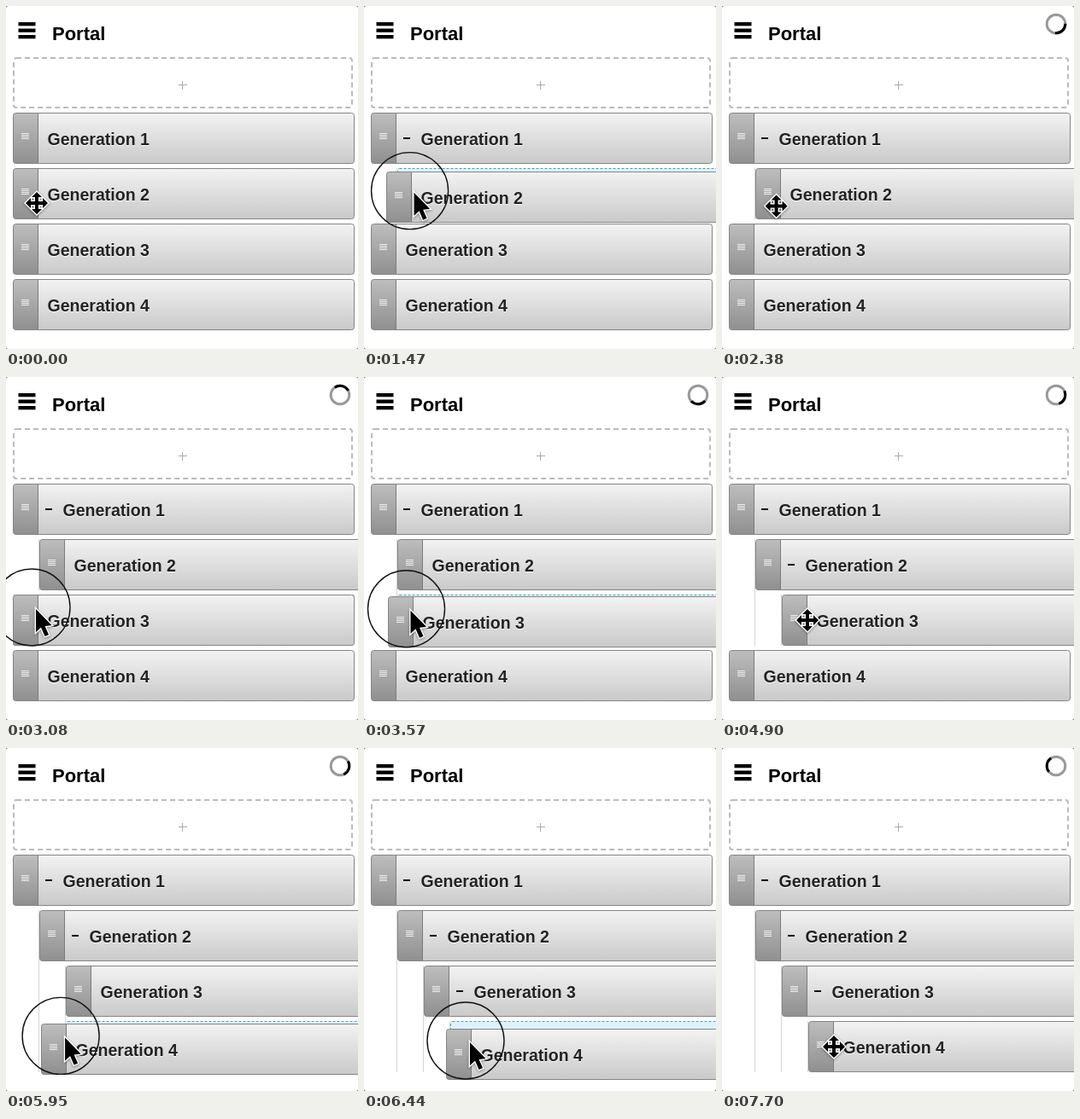
An HTML page with a canvas for the animation above (7.77 s loop, 412 by 402 pixels).

```html
<!DOCTYPE html>
<html lang="en">
<head>
<meta charset="utf-8">
<title>Nested list</title>
<style>
html, body { margin: 0; width: 100%; height: 100%; overflow: hidden; background: #fff; }
canvas { display: block; }
</style>
</head>
<body>
<canvas id="stage" width="412" height="402"></canvas>
<script>
const c = document.getElementById('stage').getContext('2d');
const LOOP = 7770, STEP = 70, SAVE_TIME = 1890;
const LEFT = 8, INDENT = 31, WIDTH = 400, HEIGHT = 60;

// The pointer travels to `grab`, presses, carries the item to `to` and drops it
const start = { x: 33, y: 222 }, rest = { x: 128, y: 341 };
const drags = [
  { item: 1, grab: { x: 36, y: 213 }, to: { x: 65, y: 219 },
    travel: 840, press: 910, carry: 1190, arrive: 1680, drop: 1960 },
  { item: 2, grab: { x: 30, y: 270 }, to: { x: 97, y: 276 },
    travel: 2240, press: 2870, carry: 3220, arrive: 4200, drop: 4550 },
  { item: 3, grab: { x: 31, y: 334 }, to: { x: 119, y: 343 },
    travel: 4900, press: 5460, carry: 5600, arrive: 6440, drop: 6860 }
];

const rowY = i => 125 + 65 * i;
const levelX = level => LEFT + INDENT * level;

function ease(t, from, to) {
  const k = Math.min(1, Math.max(0, (t - from) / (to - from)));
  return k * k * (3 - 2 * k);
}

function pointerAt(t) {
  let { x, y } = start;
  const approach = (p, from, to) => {
    const k = ease(t, from, to);
    x += (p.x - x) * k;
    y += (p.y - y) * k;
  };
  for (const d of drags) {
    approach(d.grab, d.travel, d.press);
    approach(d.to, d.carry, d.arrive);
  }
  approach(rest, drags[2].drop, LOOP - 3 * STEP);
  return { x, y };
}

function rect(x, y, w, h, color) {
  c.fillStyle = color;
  c.fillRect(x, y, w, h);
}

function text(str, x, y, size, color) {
  c.font = `bold ${size}px "Liberation Sans", Arial, sans-serif`;
  c.fillStyle = color;
  c.fillText(str, x, y);
}

function fade(top, bottom) {
  const g = c.createLinearGradient(0, 0, 0, HEIGHT);
  g.addColorStop(0, top);
  g.addColorStop(1, bottom);
  return g;
}

function roundBox(x, y, w, h, r) {
  c.beginPath();
  c.roundRect(x, y, w, h, r);
}

function stroke(width, color, dash = []) {
  c.setLineDash(dash);
  c.lineWidth = width;
  c.strokeStyle = color;
  c.stroke();
  c.setLineDash([]);
}

function arc(x, y, r, from, to, width, color) {
  c.beginPath();
  c.arc(x, y, r, from, to);
  stroke(width, color);
}

function drawHeader() {
  for (let k = 0; k < 3; k++) rect(14.5, 19 + 7.5 * k, 20, 4.3, '#000');
  text('Portal', 54, 40, 22, '#000');
  roundBox(9, 61, 396, 58, 3);
  stroke(2, '#bbb', [6, 4]);
  rect(202, 92, 10, 1, '#aaa');
  rect(206, 88, 1, 10, '#aaa');
}

function drawItem(i, x, y, open) {
  c.save();
  c.translate(x, y);
  roundBox(0.5, 0.5, WIDTH - 1, HEIGHT - 1, 3);
  c.fillStyle = fade('#f3f3f3', '#c9c9c9');
  c.fill();
  c.save();
  c.clip();
  rect(0, 0, 29, HEIGHT, fade('#bebebe', '#8f8f8f'));
  rect(29, 0, 1, HEIGHT, '#7c7c7c');
  c.restore();
  stroke(1, '#858585');

  for (let k = 0; k < 4; k++) rect(10, 24 + 2 * k, 9, 1, '#eee');
  if (open) rect(38, 29, 8, 2, '#111');
  const textX = open ? 58.6 : 40.6;
  text(`Generation ${i + 1}`, textX, 39, 19.5, '#fff');
  text(`Generation ${i + 1}`, textX, 38, 19.5, '#222');
  c.restore();
}

function drawPlaceholder(x, y) {
  roundBox(x + 0.5, y + 0.5, WIDTH - 1, HEIGHT - 1, 2);
  c.fillStyle = '#dff2fb';
  c.fill();
  stroke(1, '#4a9dbd', [3, 2]);
}

function drawSpinner(elapsed) {
  const mid = (elapsed / 1065 * 360 - 95) * Math.PI / 180;
  arc(391, 21, 10.8, 0, 7, 3, '#999');
  arc(391, 21, 10.8, mid - 0.85, mid + 0.85, 3, '#000');
}

function drawCursor(points, x, y) {
  c.save();
  c.translate(x, y);
  c.beginPath();
  points.forEach(p => c.lineTo(...p));
  c.closePath();
  c.shadowColor = 'rgba(0,0,0,.4)';
  c.shadowBlur = 3;
  c.shadowOffsetY = 1;
  stroke(2.8, '#fff');
  c.shadowColor = 'transparent';
  c.fillStyle = '#000';
  c.fill();
  c.restore();
}

const arrow = [[0, 0], [0, 27], [6, 21.5], [10.5, 32], [15, 30], [10.5, 20], [18.5, 19]];
const arm = [[-2, -2], [-2, -7], [-6, -7], [0, -13], [6, -7], [2, -7]];
const cross = [0, 1, 2, 3].flatMap(turn => arm.map(([x, y]) => {
  for (let k = 0; k < turn; k++) [x, y] = [-y, x];
  return [x, y];
}));

function draw(t) {
  const pointer = pointerAt(t);
  const active = drags.find(d => t >= d.press && t < d.drop);
  const saving = drags.findLast(d => t >= d.drop && t < d.drop + SAVE_TIME);
  const levels = [0, 0, 0, 0];
  for (const d of drags) if (t >= d.drop) levels[d.item] = d.item;

  let heldX, heldY;
  if (active) {
    const shift = pointer.x - active.grab.x;
    heldX = Math.round(LEFT + shift);
    heldY = Math.round(rowY(active.item) + pointer.y - active.grab.y);
    levels[active.item] = Math.min(active.item, Math.round((shift + 14) / INDENT));
  }

  rect(0, 0, 412, 402, '#777');
  roundBox(0, 0, 412, 402, 3);
  c.fillStyle = '#fff';
  c.fill();
  drawHeader();

  // Guide line beside each group of children
  for (let level = 1; level < 4; level++) {
    const inside = [1, 2, 3].filter(i => levels[i] >= level);
    if (!inside.length) continue;
    const top = rowY(inside[0]);
    rect(levelX(level) - 1, top, 1, rowY(inside.at(-1)) + HEIGHT - top, '#d4d4d4');
  }
  levels.forEach((level, i) => {
    if (active?.item === i) drawPlaceholder(levelX(level), rowY(i));
    else drawItem(i, levelX(level), rowY(i), levels[i + 1] > level);
  });
  if (active) drawItem(active.item, heldX, heldY, false);
  if (saving) drawSpinner(t - saving.drop);

  if (active) {
    arc(pointer.x, pointer.y, 45, 0, 7, 1.4, '#111');
    drawCursor(arrow, pointer.x + 5, pointer.y + 2);
  } else {
    drawCursor(cross, pointer.x + 3, pointer.y + 9);
  }
}

function tick() {
  const t = performance.now() % LOOP;
  draw(Math.floor(t / STEP) * STEP);
  requestAnimationFrame(tick);
}
tick();
</script>
</body>
</html>
```
